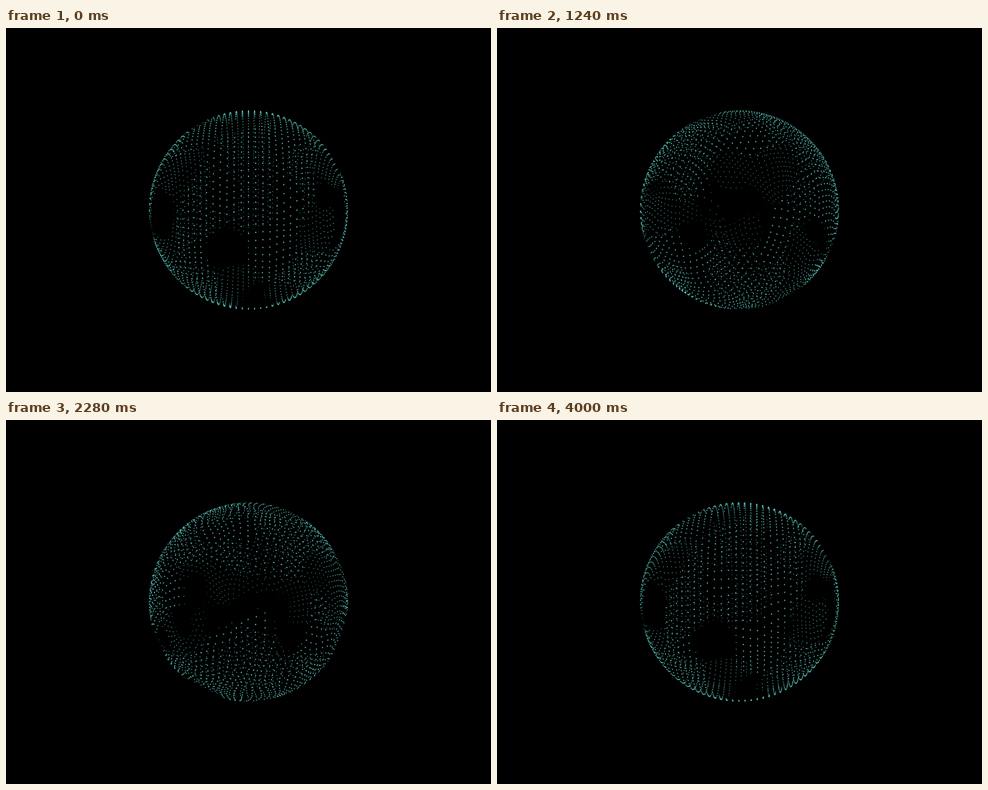
Animation, 800 px wide and 600 px high, one loop 4.04 s. Source, as an HTML page with a canvas:

```html
<!DOCTYPE html>
<html lang="en">
<head>
<meta charset="utf-8">
<title>Dotted sphere</title>
<style>
  html, body { margin: 0; width: 100%; height: 100%; overflow: hidden; background: #000; }
  canvas { display: block; }
</style>
</head>
<body>
<canvas id="stage" width="800" height="600"></canvas>
<script>
const ctx = document.getElementById('stage').getContext('2d');
const LOOP = 4040, STEP = 40, CX = 400, CY = 300;
const RIM = 163.5, CAMERA = 5, FOCAL = RIM * Math.sqrt(CAMERA * CAMERA - 1);
const PITCH = 0.09, SPACING = 0.06, RINGS = 26;
const clamp = (v, lo, hi) => Math.min(hi, Math.max(lo, v));

let seed = 97;
const random = () => (seed = (seed * 16807) % 2147483647) / 2147483647;

// Smooth random field on the sphere, with a spread of about 1
function makeField(low, high, count = 10) {
  const waves = Array.from({ length: count }, () => {
    const z = random() * 2 - 1, a = random() * Math.PI * 2, r = Math.sqrt(1 - z * z);
    const k = low + random() * (high - low);
    return { x: k * r * Math.cos(a), y: k * r * Math.sin(a), z: k * z, phase: random() * Math.PI * 2 };
  });
  return (x, y, z) => Math.sqrt(2 / count) *
    waves.reduce((sum, w) => sum + Math.sin(w.x * x + w.y * y + w.z * z + w.phase), 0);
}
const gaps = makeField(6, 14);
const drift = makeField(9, 18);

// Evenly spaced rings around the x axis, the dots shifted a little along each ring
const points = [];
for (let i = -RINGS; i <= RINGS; i++) {
  const lat = i * SPACING, a = Math.sin(lat), c = Math.cos(lat);
  const count = Math.max(1, 2 * Math.round(Math.PI * c / SPACING));
  for (let j = 0; j < count; j++) {
    const base = j / count * Math.PI * 2;
    const phi = base + 0.022 / c * drift(a, c * Math.cos(base), c * Math.sin(base));
    const y = c * Math.cos(phi), b = c * Math.sin(phi);
    points.push({ a, y, b, gap0: gaps(a, y, b), gap1: gaps(-a, y, -b) });
  }
}

// Half a turn per loop; the gaps blend into their half-turned copy, so the loop closes
function draw(t) {
  const yaw = Math.PI * t / LOOP;
  const cy = Math.cos(yaw), sy = Math.sin(yaw);
  const cp = Math.cos(PITCH), sp = Math.sin(PITCH);
  const blend0 = Math.cos(yaw / 2), blend1 = Math.sin(yaw / 2);

  ctx.fillStyle = '#000';
  ctx.fillRect(0, 0, 800, 600);
  for (const p of points) {
    const size = clamp((p.gap0 * blend0 + p.gap1 * blend1 + 0.32) * 2.4, 0, 1);
    if (size < 0.08) continue;
    const x = p.b * sy - p.a * cy, depth = p.a * sy + p.b * cy;
    const y = p.y * cp + depth * sp, z = depth * cp - p.y * sp;
    const scale = FOCAL / (CAMERA - z);
    const near = (z + 1) / 2;
    ctx.fillStyle = `rgba(92, 204, 194, ${0.68 + 0.2 * near})`;
    ctx.beginPath();
    ctx.arc(CX + x * scale, CY - y * scale, (0.72 + 0.42 * near) * (0.45 + 0.55 * size), 0, Math.PI * 2);
    ctx.fill();
  }
}

const start = performance.now();
function frame() {
  const t = (performance.now() - start) % LOOP;
  draw(Math.floor(t / STEP) * STEP);
  requestAnimationFrame(frame);
}
frame();
</script>
</body>
</html>
```
